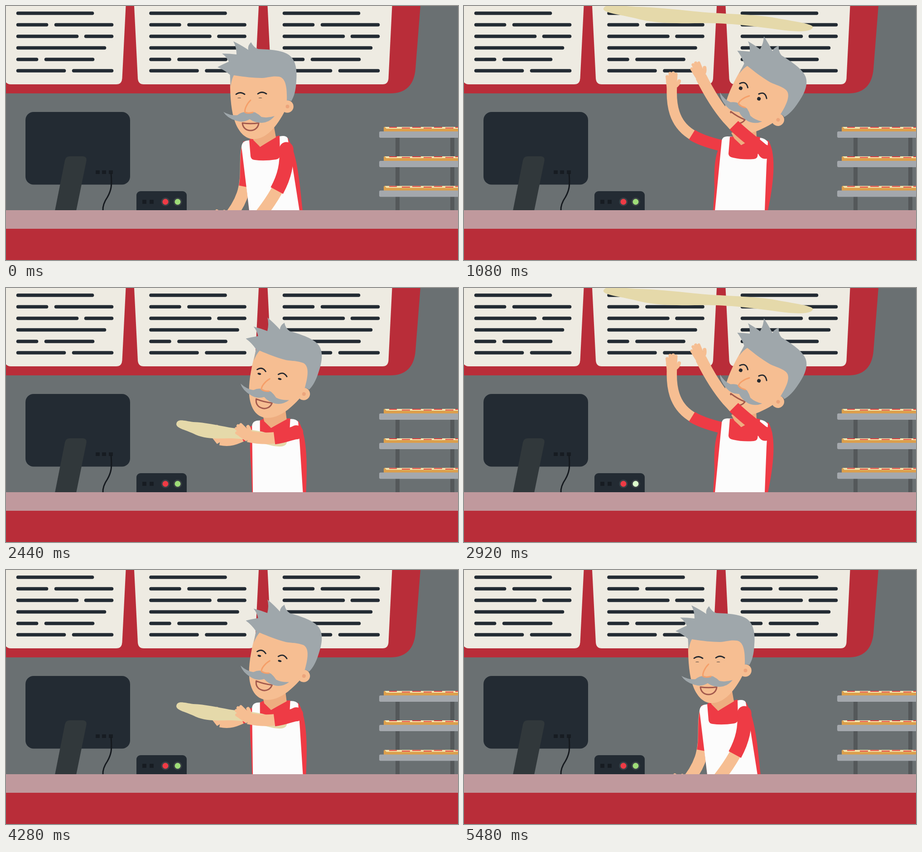
Animation, 998 px wide and 561 px high, one loop 5.52 s. Source, as an HTML page:

```html
<!DOCTYPE html>
<html lang="en">
<head>
<meta charset="utf-8">
<title>Pizza counter</title>
<style>
  html, body { margin: 0; width: 100%; height: 100%; overflow: hidden; background: #6a7072; }
  svg { display: block; width: 100vw; height: 100vh; }
  .line { fill: none; stroke-linecap: round; stroke-linejoin: round; }
  .skin { fill: #f6be92; }
  .arm { fill: none; stroke: #f6be92; }
  .sleeve { fill: none; stroke: #ee3b45; }
  .shirt { fill: #ee3b45; }
  .hair { fill: #9fa7ab; }
  .dark { fill: #232b33; }
  .port { fill: #171c22; }
</style>
</head>
<body>
<svg viewBox="0 0 998 561" preserveAspectRatio="none">
  <defs>
    <g id="menu">
      <path fill="#eeebe2" d="M283 0L291 160Q292 173 304 173H537Q549 173 550 160L558 0Z"/>
      <path class="line" stroke="#232b33" stroke-width="7.6" d="M320 16H484M320 41.5H383M404 41.5H527M320 67H450M470 67H527M320 92.500H511M320 118H361M382 118H485M320 143H422M443 143H527"/>
    </g>
    <g id="shelf">
      <rect x="834" y="-10" width="180" height="11" rx="2" fill="#dc9f4c"/>
      <path fill="#f3e6b0" d="M836 -10H998V-6H840Z"/>
      <path stroke="#e5413f" stroke-width="2" d="M846 -9H863M897 -9H916M945 -9H963M992 -9H998M874 -7.500H892M922 -7.500H940M970 -7.500H988"/>
      <rect x="824" width="190" height="14" rx="3" fill="#a4a8ad"/>
    </g>
    <g id="hand">
      <path class="skin" d="M-11 4L-13 -14Q0 -22 11 -14L11 4Z"/>
      <path class="line" stroke="#f6be92" stroke-width="7" d="M-9 -12L-10.500 -24M-3 -14L-4 -31M3 -14L3 -32M8 -13L9 -29"/>
      <path class="line" stroke="#f6be92" stroke-width="8" d="M7 -2Q14 -6 16 -14"/>
    </g>
  </defs>

  <rect width="998" height="561" fill="#6a7072"/>
  <path fill="#b92d39" d="M0 0H915L904 140Q899 193 848 193H0Z"/>
  <use href="#menu" x="-293.500"/>
  <use href="#menu"/>
  <use href="#menu" x="294.500"/>

  <path fill="#54585a" d="M860 285H869V452H860ZM981 285H990V452H981Z"/>
  <use href="#shelf" y="277"/>
  <use href="#shelf" y="342"/>
  <use href="#shelf" y="407.500"/>

  <rect class="dark" x="43" y="234" width="231" height="160.500" rx="18"/>
  <path fill="#31383b" d="M108 452L130 341Q132 332 141 332H169Q179 332 177.500 342L155 452Z"/>
  <path class="port" d="M198 363h9v8h-9zM212 363h9v8h-9zM227 363h9v8h-9z"/>
  <path class="line" stroke="#15191e" stroke-width="3" d="M232 370C234 396 233 406 224 422Q213 438 214 452"/>
  <rect class="dark" x="288" y="409" width="111" height="60" rx="9"/>
  <path class="port" d="M301 428h9v9h-9zM317 428h9v9h-9z"/>
  <g stroke="#3b4046" stroke-width="3">
    <circle cx="352" cy="432.500" r="8" fill="#ee3b45"/>
    <circle id="lamp" cx="379" cy="432.500" r="8" fill="#9edc78"/>
  </g>

  <path id="farArm" class="arm"/>
  <path id="farSleeve" class="sleeve" pathLength="100"/>
  <use id="farHand" href="#hand"/>
  <path id="body" class="shirt"/>
  <path id="apron" fill="#fcfcfc"/>
  <path id="collar" class="shirt"/>
  <path id="neck" fill="#eead80"/>

  <g id="head">
    <path class="skin" d="M495 150C494 200 497 236 508 262C518 284 532 294 547 294C566 294 585 280 600 258C614 238 622 222 622 205L622 150Z"/>
    <circle class="skin" cx="621" cy="222" r="13.800"/>
    <circle cx="621.500" cy="222" r="4" fill="#eca57c"/>
    <path class="hair" d="M496 178L494.500 152Q482 141 467 135Q480 128 492 123Q487 112 477 105Q494 105 509 107Q509 91 502 78Q522 88 535 97Q533 88 541 80Q547 92 557 95C585 96 612 98 626 109C640 120 643 142 641 165C640 187 636 200 630 210Q625 207 620 209C621 178 617 159 603 156C588 154 580 158 565 159C545 159 522 156 503 153Q498 162 496 178Z"/>
    <path id="brows" class="line" stroke="#25292f" stroke-width="2.800"/>
    <ellipse class="pupil" cx="515" cy="203" rx="4" fill="#25292f"/>
    <ellipse class="pupil" cx="561.500" cy="203" rx="4" fill="#25292f"/>
    <path class="line" stroke="#a35a4d" stroke-width="3" d="M522 258.500Q540 261 558 258.500C557 269 549 275 540 275C530 275 523 269 522 258.500Z"/>
    <path class="hair" d="M480 234Q497 243 511 241Q520 234 529 234Q534 234 538 237Q543 233 550 235Q558 239 564 245Q577 248 593 243Q582 257 565 258Q549 258 538 250Q524 259 507 253Q488 247 480 234Z"/>
    <path class="line" stroke="#f59f69" stroke-width="3" d="M540 208C531 217 526 229 528 235Q534 238 545 235"/>
  </g>

  <path id="dough" fill="#e5d9aa" d="M-231 -20C-228 -34 -200 -28 -160 -25C-110 -24 -60 -18 -10 -13C60 -8 100 -8 140 -2C180 6 232 12 231 20C228 32 190 30 160 26C100 18 60 12 0 11C-60 11 -100 14 -150 3C-190 -8 -228 -10 -231 -20Z"/>

  <path id="nearArm" class="arm"/>
  <path id="nearSleeve" class="sleeve" pathLength="100"/>
  <circle id="shoulder" class="shirt" r="15.500"/>
  <use id="nearHand" href="#hand"/>

  <rect y="451" width="998" height="42" fill="#c0999d"/>
  <rect y="492" width="998" height="69" fill="#b92d39"/>
</svg>

<script>
const LOOP = 5520, CYCLE = 1840, STEP = 40;
const $ = id => document.getElementById(id);
const pupils = document.querySelectorAll('.pupil');

// Each shape: working pose, throwing pose
const poses = {
  body: ['M524 299C521 320 526 360 531 400L537 452L655 452C649 400 645 330 622 291Z',
         'M575 296C552 318 552 360 553 403L550 452L671 452C682 400 692 330 672 297Z'],
  apron: ['M520 311Q521 298 534 297L604 288Q618 285 622 292L632 350L648 452L537 452Z',
          'M569 298Q570 288 582 288L654 291Q664 292 671 300L668 350L664 452L554 452Z'],
  collar: ['M537 296L547 288L561 311L596 288L604 286L605 330Q604 338 596 339Q570 343 549 340Q541 339 540 332Z',
           'M587 289L596 288L612 307L646 288L654 290L648 332Q647 337 640 338Q615 340 594 335Q584 333 584 326Z'],
  neck: ['M546 280L546 296L561 311L596 290L591 262Z',
         'M590 280L597 293L612 307L646 290L645 268Z'],
  farArm: ['M533 312C522 360 548 405 486 475', 'M585 312C500 295 455 270 459 180'],
  nearArm: ['M619 316C622 370 605 410 545 482', 'M665 322C610 275 575 260 523 156'],
  brows: ['M508 195Q517 188 527 195M556 194Q565 187 575 194',
          'M508 195Q517 182 528 194M556 194Q565 181 576 194']
};

const leanKeys = [[0, 0], [200, .03], [380, .06], [560, .3], [680, .82], [760, 1.04],
  [880, 1], [1400, 1], [1480, .96], [1560, .86], [1640, .65], [1720, .36], [1800, 0], [1840, 0]];

const mix = (a, b, k) => a + (b - a) * k;

function mixPath([a, b], k) {
  const ends = b.match(/[\d.]+/g);
  let i = 0;
  return a.replace(/[\d.]+/g, n => mix(+n, +ends[i++], k).toFixed(2));
}

function valueAt(keys, t) {
  const i = keys.findIndex(key => key[0] > t);
  const [t0, v0] = keys[i - 1], [t1, v1] = keys[i];
  return mix(v0, v1, (t - t0) / (t1 - t0));
}

function set(id, attrs) {
  for (const name in attrs) $(id).setAttribute(name, attrs[name]);
}

function drawArm(side, lean, skin, sleeve, cover) {
  const d = mixPath(poses[side + 'Arm'], lean);
  set(side + 'Arm', { d, 'stroke-width': skin });
  set(side + 'Sleeve', { d, 'stroke-width': sleeve, 'stroke-dasharray': `${cover} 200` });
  const p = d.match(/[\d.]+/g).map(Number);
  return { start: p.slice(0, 2), end: p.slice(-2) };
}

function draw(time) {
  const t = time % CYCLE;
  const lean = valueAt(leanKeys, t);

  for (const id of ['body', 'apron', 'collar', 'neck', 'brows']) {
    set(id, { d: mixPath(poses[id], lean) });
  }
  set('head', { transform: `translate(${45 * lean} ${-5.5 * lean}) rotate(${30 * lean} 570 290)` });
  pupils.forEach(p => p.setAttribute('ry', Math.min(4, mix(.5, 4, lean))));

  const far = drawArm('far', lean, mix(26, 22.5, lean), 25, mix(50, 42, lean));
  const near = drawArm('near', lean, mix(26, 25, lean), mix(31, 27, lean), mix(51, 41, lean));
  set('farHand', { transform: `translate(${far.end}) rotate(${mix(-60, 0, lean)})` });
  set('nearHand', { transform: `translate(${near.end}) rotate(${mix(-70, -26, lean)})` });
  set('shoulder', { cx: near.start[0], cy: near.start[1] });

  // The dough widens as it flies
  const air = Math.max(0, 1 - ((t - 1120) / 260) ** 2);
  const x = 498 + 42 * air;
  const y = 500 - 378 * lean - 97.5 * air;
  set('dough', { transform: `translate(${x} ${y}) scale(${(122 + 112 * air) / 231} 1)` });

  set('lamp', { fill: time >= 2700 && time < 3160 ? '#dcfccc' : '#9edc78' });
}

const begin = performance.now();
function tick() {
  const time = (performance.now() - begin) % LOOP;
  draw(Math.floor(time / STEP) * STEP);
  requestAnimationFrame(tick);
}
tick();
</script>
</body>
</html>
```
